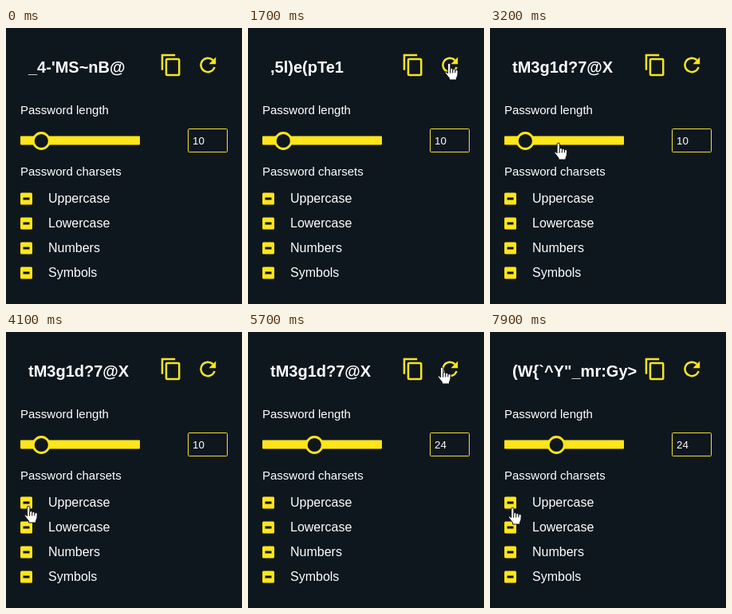
These frames come from a looping animation (296x346 px, 8 s). An HTML page:

```html
<!DOCTYPE html>
<html lang="en">
<head>
<meta charset="utf-8">
<title>Password generator</title>
<style>
  html, body { margin: 0; width: 100%; height: 100%; overflow: hidden; background: #0f171e; }
  svg { display: block; width: 296px; height: 346px; font-family: "Liberation Sans", Arial, sans-serif; fill: #fff; }
  .y { fill: #fde61a; }
  .bg { fill: #0f171e; }
  .line { fill: none; stroke: #f3e42c; }
  .icon { stroke-width: 2; }
  .cursor { fill: #fff; stroke: #111; stroke-linejoin: round; }
</style>
</head>
<body>
<svg viewBox="0 0 296 346">
  <text id="password" x="28" y="56" font-size="20" font-weight="700"></text>
  <g class="line icon" transform="translate(192.2 31.5) scale(1.25)">
    <path d="M3 17V2H16"/>
    <rect x="7" y="6" width="13" height="16" rx="1"/>
  </g>
  <g class="line icon" transform="translate(238.2 31.5) scale(1.25)">
    <path d="M18.7 14A7 7 0 1 1 17 7"/>
    <path class="y" stroke="none" d="M13 11H20V4Z"/>
  </g>

  <text x="18" y="108" font-size="15">Password length</text>
  <rect class="y" x="18" y="135.5" width="150" height="11" rx="1"/>
  <circle id="thumb" class="bg" cy="141.5" r="10" stroke="#fde61a" stroke-width="2.8"/>
  <rect class="line" x="228.5" y="126.5" width="49" height="29" rx="1"/>
  <text id="count" x="234" y="146" font-size="13.33"></text>

  <text x="18" y="185" font-size="15">Password charsets</text>
  <g id="rows"></g>

  <g id="hand" class="cursor">
    <g id="fingers"></g>
    <path d="M-2 12L-4 9.5L-5 11.5L0 18V20H9V18L10.5 14V11"/>
  </g>
  <path id="arrow" class="cursor" d="M0 0V16L4 12.5L6.5 18.5L9 17.5L6.5 11.5H11.5Z"/>
</svg>
<script>
const LOOP = 8000, STEP = 100, TRAVEL = 500, ENTER = 800;
const ROW = 31, THUMB_MIN = 44.3, PX_PER_CHAR = 2.79;
const $ = id => document.getElementById(id);

$('rows').innerHTML = ['Uppercase', 'Lowercase', 'Numbers', 'Symbols'].map((name, i) => `
  <g transform="translate(18 ${206 + i * ROW})">
    <rect class="y" y=".5" width="15" height="15" rx="1.5"/>
    <rect class="bg" x="3.5" y="6.5" width="8" height="3"/>
    <text x="35" y="13" font-size="16">${name}</text>
  </g>`).join('');

$('fingers').innerHTML = [0, 1, 2, 3].map(i => {
  const top = i ? 4.5 + i : -0.8;
  return `<rect x="${3.1 * i - 1.9}" y="${top}" width="3.3" height="${14 - top}" rx="1.6"/>`;
}).join('');

const passwords = { 0: "_4-'MS~nB@", 1300: ',5l)e(pTe1', 2000: 'tM3g1d?7@X', 5900: '(W{`^Y"_mr:Gy>' };

const entry = { x: 258, y: 296 };
const checkbox = { x: 28.5, y: 219 };
const drag = { at: 4600, x: 83.3, y: 142 };
const moves = [
  { at: ENTER, x: 252.5, y: 45 },
  { at: 2200, x: 86, y: 145 },
  { at: 3400, ...checkbox },
  { at: 4100, x: THUMB_MIN, y: 142 },
  drag,
  { at: 5200, x: 243.5, y: 45 },
  { at: 6300, x: 89, y: 200 },
  { at: 7200, ...checkbox, y: 221 }
];

const progress = (t, at) => {
  const p = Math.min(1, Math.max(0, (t - at) / TRAVEL));
  return p * p * (3 - 2 * p);
};
const mix = (a, b, p) => a + (b - a) * p;

const locate = t => moves.reduce((from, to) => {
  const p = progress(t, to.at);
  return { x: mix(from.x, to.x, p), y: mix(from.y, to.y, p) };
}, entry);

function isClickable({ x, y }) {
  const icon = y > 31 && y < 62 && (Math.abs(x - 207) < 16 || Math.abs(x - 253) < 16);
  const track = x > 18 && x < 168 && Math.abs(y - 141) < 12;
  const box = x > 17 && x < 35 && y > 203 && (y - 203) % ROW < 21;
  return icon || track || box;
}

function show(el, at, visible) {
  el.style.display = visible ? '' : 'none';
  el.setAttribute('transform', `translate(${at.x.toFixed(1)} ${at.y.toFixed(1)})`);
}

function draw(t) {
  const at = locate(t), inside = t >= ENTER, over = isClickable(at);
  show($('hand'), at, inside && over);
  show($('arrow'), at, inside && !over);

  const x = mix(THUMB_MIN, drag.x, progress(t, drag.at));
  $('thumb').setAttribute('cx', x);
  $('count').textContent = Math.round(10 + (x - THUMB_MIN) / PX_PER_CHAR);
  const changed = Object.keys(passwords).filter(time => time <= t).pop();
  $('password').textContent = passwords[changed];
}

const start = performance.now();
function tick() {
  const t = (performance.now() - start) % LOOP;
  draw(Math.floor(t / STEP) * STEP);
  requestAnimationFrame(tick);
}
draw(0);
requestAnimationFrame(tick);
</script>
</body>
</html>
```
